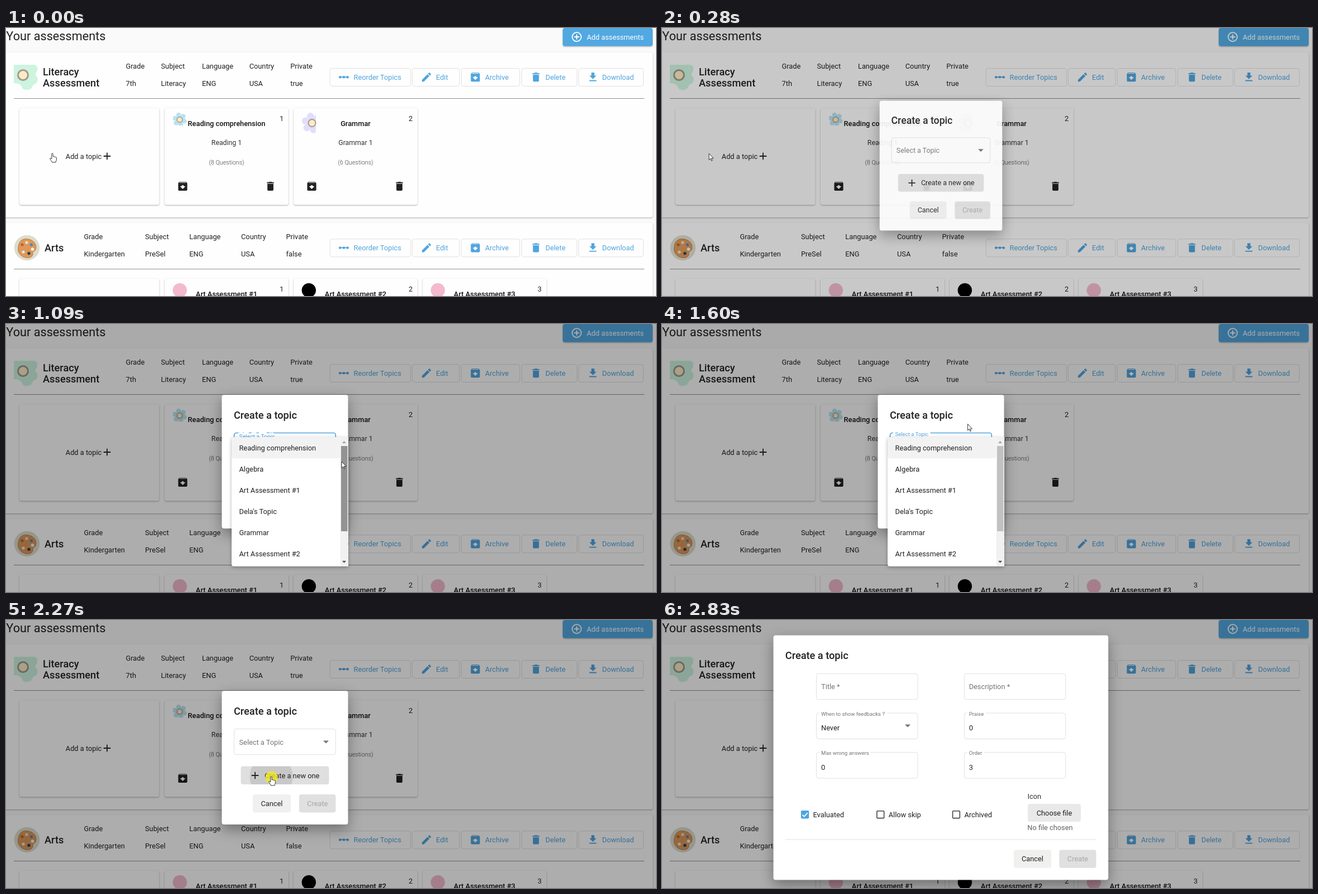
An HTML page for the animation above (2890 ms loop, 1164 by 481 pixels).

```html
<!DOCTYPE html>
<html lang="en">
<head>
<meta charset="utf-8">
<title>Your assessments</title>
<style>
  html, body { margin: 0; width: 100%; height: 100%; overflow: hidden; background: #fafafa; }
  svg { display: block; width: 1164px; height: 481px; font: 12.8px Roboto, sans-serif; }
  .card { filter: drop-shadow(0 1px 1.2px rgba(0,0,0,.32)); }
  .lift { filter: drop-shadow(0 9px 12px rgba(0,0,0,.36)); }
  .menu { filter: drop-shadow(0 2px 3px rgba(0,0,0,.3)); }
  .float { paint-order: stroke; stroke: #fff; stroke-width: 8px; }
</style>
</head>
<body>
<svg id="stage" viewBox="0 0 1164 481"></svg>
<script>
const BLUE = '#4fa5df', INK = '#212121', GREY = '#757575';
const LOOP = 2890;

const ICONS = {
  reorder: 'M19.5 9.5c-1.03 0-1.9.62-2.29 1.5h-2.92c-.39-.88-1.26-1.5-2.29-1.5s-1.9.62-2.29 1.5H6.79c-.39-.88-1.26-1.5-2.29-1.5a2.5 2.5 0 0 0 0 5c1.03 0 1.9-.62 2.29-1.5h2.92c.39.88 1.26 1.5 2.29 1.5s1.9-.62 2.29-1.5h2.92c.39.88 1.26 1.5 2.29 1.5a2.5 2.5 0 0 0 0-5z',
  edit: 'M3 17.25V21h3.75L17.81 9.94l-3.75-3.75zM20.71 7.04a1 1 0 0 0 0-1.41l-2.34-2.34a1 1 0 0 0-1.41 0l-1.83 1.83 3.75 3.75z',
  archive: 'M20.54 5.23l-1.39-1.68Q18.7 3 18 3H6q-.7 0-1.16.55L3.46 5.23Q3 5.8 3 6.5V19a2 2 0 0 0 2 2h14a2 2 0 0 0 2-2V6.5q0-.7-.46-1.27zM12 17.5L6.5 12H10v-2h4v2h3.5zM5.12 5l.81-1h12l.94 1z',
  trash: 'M6 19a2 2 0 0 0 2 2h8a2 2 0 0 0 2-2V7H6zM19 4h-3.5l-1-1h-5l-1 1H5v2h14z',
  download: 'M19 9h-4V3H9v6H5l7 7zM5 18v2h14v-2z',
  plus: 'M19 13h-6v6h-2v-6H5v-2h6V5h2v6h6z',
  plusRing: 'M13 7h-2v4H7v2h4v4h2v-4h4v-2h-4zM12 2a10 10 0 1 0 0 20 10 10 0 0 0 0-20zm0 18a8 8 0 1 1 0-16 8 8 0 0 1 0 16z'
};

const rect = (x, y, x2, y2, fill, more = '') =>
  `<rect x="${x}" y="${y}" width="${x2 - x}" height="${y2 - y}" rx="4" fill="${fill}" ${more}/>`;
const text = (x, y, s, fill = INK, more = '') =>
  `<text x="${x}" y="${y}" fill="${fill}" ${more}>${s}</text>`;
const mid = (x, y, s, fill, more = '') => text(x, y, s, fill, `text-anchor="middle" ${more}`);
const dot = (x, y, r, fill, more = '') => `<circle cx="${x}" cy="${y}" r="${r}" fill="${fill}" ${more}/>`;
const line = (x, x2, y, color) => `<path d="M${x} ${y}H${x2}" stroke="${color}"/>`;
const icon = (name, x, y, fill) =>
  `<path transform="translate(${x} ${y}) scale(.9) translate(-12 -12)" d="${ICONS[name]}" fill="${fill}" fill-rule="evenodd"/>`;
const caret = (x, y, fill, more = '') => `<path d="M${x - 5} ${y - 2.5}h10l-5 5z" fill="${fill}" ${more}/>`;
const button = (x, y, x2, y2, label, fill, color) =>
  rect(x, y, x2, y2, fill) + mid((x + x2) / 2, y + 20.5, label, color);
const BIG = 'font-size="18.2" font-weight="500"';

function flower(x, y, r, size, color, box) {
  const id = 'clip' + x;
  let petals = dot(x, y, size * .8, color);
  for (let i = 0; i < 6; i++) {
    const a = i * Math.PI / 3 + .3;
    petals += dot(x + size * Math.cos(a), y + size * Math.sin(a), size * .5, color);
  }
  return `<clipPath id="${id}">${rect(...box, '#000')}</clipPath><g clip-path="url(#${id})">${petals}</g>` +
    dot(x, y, r, '#faecc3', `stroke="#a5988f" stroke-width="${r * .3}"`);
}

function mintFlower() {
  return `<path d="M14 66H51Q58 68 56 77 51 83 54 86 60 93 53 100 49 101 48 103 46 111 38 111 30 112 28 105 24 98 14 99Z" fill="#cdf4df"/>` +
    dot(30.5, 84.5, 9, '#faecc3', 'stroke="#a5988f" stroke-width="3"');
}

function palette() {
  return dot(37.5, 394.5, 22.7, '#dddccd') +
    '<path d="M22 393C23 381 31 377 40 379 51 381 56 390 53 398 50 402 47 401 48 406 47 414 35 414 28 409 22 404 21 399 22 393Z" fill="#dd985a" stroke="#b97840"/>' +
    dot(29, 389, 2.5, '#a9643d') + dot(37, 385, 2.6, '#f2dfbd') + dot(45.5, 389, 2.6, '#4c86bd') +
    dot(47.5, 397, 2.8, '#f7f3ea') + dot(31, 402, 2.6, '#f4e6d2') + dot(41, 404.5, 2.7, '#29405c');
}

// Heading row shared by both assessments
function header(dy, columns) {
  const actions = [
    [580, 724.5, 605, 622.5, 'reorder', 'Reorder Topics'], [727.5, 812, 753, 770, 'edit', 'Edit'],
    [815.5, 920, 840.5, 858, 'archive', 'Archive'], [923.5, 1022.5, 949, 966, 'trash', 'Delete'],
    [1025.5, 1141.5, 1051, 1067.5, 'download', 'Download']
  ];
  return columns.map(([x, name, value]) =>
    text(x, 72.5 + dy, name) + text(x, 103.5 + dy, value)).join('') +
    actions.map(([x, x2, ix, tx, name, label]) =>
      rect(x, 72.5 + dy, x2, 104.5 + dy, 'none', 'stroke="#e0e0e0"') +
      icon(name, ix, 88.2 + dy, BLUE) + text(tx, 92.7 + dy, label, BLUE)).join('') +
    line(14, 1143, 126.5 + dy, '#8e8e8e');
}

const tile = (x, x2, y, title, n) =>
  rect(x, y, x2, y + 174, '#fefefe', 'class="card"') +
  (n ? mid(x + 111, y + 32.3, title, '#111', 'font-weight="500"') + mid(x + 209.5, y + 23.2, n) : '');

const topic = (x, title, n, sub, count) =>
  tile(x, x + 222, 143.5, title, n) +
  mid(x + 111, 209.5, sub, '#333', 'font-size="12.3"') +
  mid(x + 111, 245, `(${count} Questions)`, '#444', 'font-size="10.8" font-weight="300"') +
  icon('archive', x + 32.5, 284, INK) + icon('trash', x + 189.5, 284, INK);

const page =
  rect(-10, -10, 1174, 491, '#fafafa') +
  text(.3, 21.5, 'Your assessments', INK, 'font-size="21.7"') +
  rect(997, 0, 1158, 32.5, '#52a8e1', 'class="card"') + icon('plusRing', 1022, 16, '#fff') + text(1040, 20.7, 'Add assessments', '#fff') +
  rect(-5, 43.5, 1158.5, 340, '#fefefe', 'class="card"') +
  mintFlower() + text(66, 85, 'Literacy', INK, BIG) + text(66, 105, 'Assessment', INK, BIG) +
  header(0, [[214.5, 'Grade', '7th'], [277.5, 'Subject', 'Literacy'], [351, 'Language', 'ENG'],
    [435.7, 'Country', 'USA'], [509.3, 'Private', 'true']]) +
  tile(24, 274.5, 143.5) + text(106.8, 234.5, 'Add a topic') + icon('plus', 181, 230, INK) +
  topic(284, 'Reading comprehension', 1, 'Reading 1', 8) + topic(515, 'Grammar', 2, 'Grammar 1', 6) +
  flower(311, 164.5, 4.8, 8.6, '#b9e2ef', [299, 152, 324, 175]) +
  flower(548, 170.5, 6.5, 12.5, '#e1defc', [530, 152, 555, 189]) +
  rect(-5, 350, 1158.5, 500, '#fefefe', 'class="card"') +
  palette() + text(69, 400.7, 'Arts', INK, BIG) +
  header(306.2, [[139.5, 'Grade', 'Kindergarten'], [249, 'Subject', 'PreSel'], [328.3, 'Language', 'ENG'],
    [421, 'Country', 'USA'], [501.5, 'Private', 'false']]) +
  tile(24, 274.5, 449.5) +
  [1, 2, 3].map(n => {
    const x = 53 + 231 * n;
    return tile(x, x + 222, 449.5, 'Art Assessment #' + n, n) + dot(x + 27.3, 470.8, 12.7, n == 2 ? '#000' : '#f3bacd');
  }).join('');

const picker =
  rect(386.5, 127, 612.5, 367, '#fff', 'class="lift"') +
  text(408, 169.5, 'Create a topic', INK, BIG) +
  rect(408.5, 195.5, 590.3, 241.7, 'none', 'id="field"') +
  text(417.5, 223.5, 'Select a Topic', GREY, 'id="label" class="float"') + caret(573, 219, GREY, 'id="caret"') +
  rect(420.5, 262.5, 578.5, 295, '#dfdfdf') +
  `<clipPath id="inside">${rect(420.5, 262.5, 578.5, 295, '#000')}</clipPath>` +
  dot(475, 281, 0, '#000', 'id="ripple" opacity=".1" clip-path="url(#inside)"') +
  icon('plus', 446, 279, INK) + text(463, 283.5, 'Create a new one') +
  button(442, 313, 510, 345.5, 'Cancel', '#f0f0f0') + button(525, 313, 590.5, 345.5, 'Create', '#e0e0e0', '#a6a6a6');

const menu =
  rect(404, 203, 613, 435, '#fff', 'class="menu"') + rect(404, 203, 598.5, 241, '#f2f2f2') +
  ['Reading comprehension', 'Algebra', 'Art Assessment #1', 'Dela\'s Topic', 'Grammar', 'Art Assessment #2']
    .map((s, i) => text(417.5, 227 + 38.05 * i, s)).join('') +
  '<path d="M598.5 203H613V435H598.5Z" fill="#f1f1f1"/><path id="thumb" d="M600 219h11.5v153H600Z"/>' +
  '<path d="M602 214h7l-3.5-4z" fill="#a3a3a3"/><path d="M602 425h7l-3.5 4z" fill="#505050"/>';

function input(x, y, label, value) {
  const frame = rect(x + .5, y + .5, x + 182, y + 47, 'none', 'stroke="#e0e0e0"');
  return frame + (value === undefined ? text(x + 9, y + 28.5, label, GREY)
    : text(x + 9, y + 5.2, label, GREY, 'class="float" font-size="9.6"') + text(x + 9, y + 31.7, value));
}
const check = (x, label, on) =>
  `<rect x="${x + .8}" y="342.8" width="12.8" height="12.8" rx="1" fill="${on ? BLUE : 'none'}" stroke="${on ? BLUE : '#444'}" stroke-width="1.6"/>` +
  (on ? `<path d="M${x + 2.5} 349.5l3.2 3.2 6.3-6.5" fill="none" stroke="#fff" stroke-width="1.7"/>` : '') +
  text(x + 21.7, 353.5, label);

const form =
  rect(199.5, 27.5, 799.2, 466.5, '#fff', 'class="lift"') +
  text(220.8, 70.3, 'Create a topic', INK, BIG) +
  input(276, 95.7, 'Title *') + input(540.7, 95.7, 'Description *') +
  input(276, 166.5, 'When to show feedbacks ?', 'Never') + caret(440, 190, GREY) + input(540.7, 166.5, 'Praise', 0) +
  input(276, 237, 'Max wrong answers', 0) + input(540.7, 237, 'Order', 3) +
  check(248.8, 'Evaluated', true) + check(384, 'Allow skip') + check(519.7, 'Archived') +
  text(654.5, 321, 'Icon', '#333') + button(655, 330, 750, 362, 'Choose file', '#e9e9e9') +
  text(654.3, 376.7, 'No file chosen', '#616161') + line(221, 777.5, 394, '#e0e0e0') +
  button(630, 412.5, 697, 445, 'Cancel', '#f0f0ef') + button(711.5, 412.5, 777.5, 445, 'Create', '#e0e0e0', '#a6a6a6');

const pointer =
  dot(.5, 1.5, 11.2, '#efe72a', 'id="press" opacity=".82"') +
  '<g fill="#fff" stroke="#222" stroke-width=".9" stroke-linejoin="round">' +
  '<path id="arrow" d="M0 0V11.5L2.6 9.1 4.4 13.2 6 12.5 4.3 8.5H8Z"/>' +
  '<path id="hand" d="M-1.2 1.2Q-1.2 0 0 0T1.2 1.2V6Q2.5 5.2 3.6 6.2 5 5.6 5.9 6.8 7.4 6.6 7.4 8.2V11Q7.4 13 6.2 14.5V16H-.8V14.8Q-3 12.5-4.4 9.6-4.2 7.8-2.6 8.8L-1.2 10Z"/></g>';

const layer = (id, content) => `<g id="${id}">${content}</g>`;
document.getElementById('stage').innerHTML =
  page + rect(-10, -10, 1174, 491, '#000', 'id="shade"') +
  layer('picker', picker) + layer('menu', menu) + layer('form', form) + layer('pointer', pointer);

const $ = id => document.getElementById(id);
const set = (id, attrs) => { for (const k in attrs) $(id).setAttribute(k, attrs[k]); };
const show = (id, on) => set(id, { visibility: on ? 'visible' : 'hidden' });

// Cubic bezier easing, solved by bisection
function bezier(x1, y1, x2, y2) {
  const at = (a, b, s) => 3 * (1 - s) * (1 - s) * s * a + 3 * (1 - s) * s * s * b + s * s * s;
  return x => {
    if (x <= 0) return 0;
    if (x >= 1) return 1;
    let lo = 0, hi = 1;
    for (let i = 0; i < 24; i++) {
      const s = (lo + hi) / 2;
      if (at(x1, x2, s) < x) lo = s; else hi = s;
    }
    return at(y1, y2, lo);
  };
}
const swift = bezier(.25, .8, .25, 1), decel = bezier(0, 0, .2, 1);
const within = (t, spans) => spans.some(([a, b]) => t >= a && t < b);

const OPEN = 190, DROP = 975, CLOSE = 1790, TAP = 2213, SWAP = 2335;
const PRESSES = [[135, 205], [960, 1030], [1735, 1830], [TAP, SWAP]];
const ARROWS = [[275, 615], [720, 778], [1040, 2090], [SWAP, LOOP]];
const PATH = [[0, 83, 225], [280, 83, 225], [550, 405, 292], [620, 444, 296], [690, 501, 270],
  [830, 566, 222], [1000, 573, 221], [1090, 601, 247], [1220, 599, 238], [1420, 566, 200],
  [1550, 547.5, 179.5], [1800, 547.5, 179.5], [1900, 540, 195], [2190, 475, 281], [2500, 475, 281],
  [2790, 726, 448], [LOOP, 726, 448]];

function position(t) {
  const i = PATH.findIndex(p => p[0] > t);
  const [t0, x0, y0] = PATH[i - 1], [t1, x1, y1] = PATH[i];
  const k = (t - t0) / (t1 - t0);
  return [x0 + (x1 - x0) * k, y0 + (y1 - y0) * k];
}

function draw(t) {
  set('shade', { opacity: .32 * swift((t - OPEN) / 400) });

  const enter = decel((t - OPEN) / 150);
  set('picker', {
    opacity: t < SWAP ? enter : 0,
    transform: `translate(499.5 247) scale(${.7 + .3 * enter}) translate(-499.5 -247)`
  });
  const focus = t > 340 && t < TAP, tint = focus ? BLUE : GREY;
  set('field', { stroke: focus ? BLUE : '#e0e0e0', 'stroke-width': focus ? 1.7 : 1 });
  const up = t < CLOSE ? swift((t - DROP) / 400) : 1 - swift((t - CLOSE) / 400);
  set('label', { y: 223.5 - 22.5 * up, 'font-size': 12.8 - 3.2 * up, fill: tint });
  set('caret', { fill: tint });
  set('ripple', { r: 105 * decel((t - TAP) / 450) });

  const unfold = decel((t - DROP) / 120);
  const fade = Math.min(1, Math.max(0, (t - CLOSE - 25) / 100));
  set('menu', {
    opacity: unfold * (1 - fade),
    transform: `translate(0 203) scale(1 ${.8 + .2 * unfold}) translate(0 -203)`
  });
  set('thumb', { fill: t < 1240 ? '#939393' : '#c1c1c1' });
  show('form', t >= SWAP);

  set('pointer', { transform: `translate(${position(t)})` , opacity: t < 2815 ? 1 : 0 });
  const arrow = within(t, ARROWS);
  show('arrow', arrow);
  show('hand', !arrow);
  show('press', within(t, PRESSES));
}

const start = performance.now();
function tick() {
  draw((performance.now() - start) % LOOP);
  requestAnimationFrame(tick);
}
tick();
</script>
</body>
</html>
```
